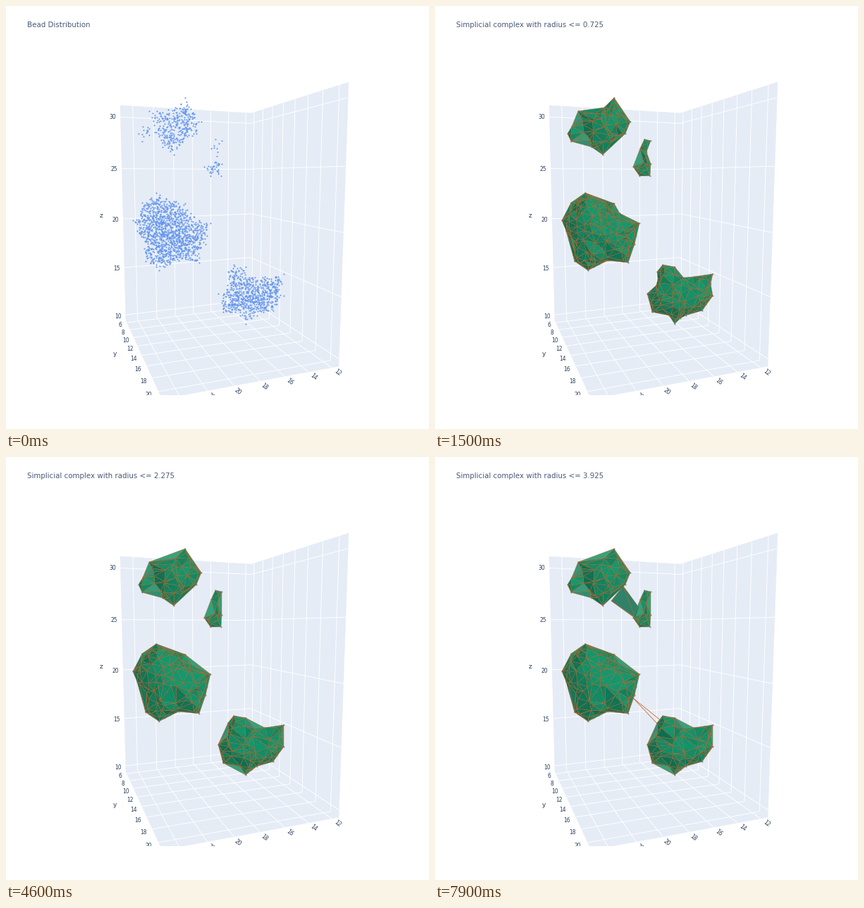
Recreate the animation shown at these times as a matplotlib script. Size 600 px wide and 600 px high, loop 8 s.

```python
import numpy as np
import matplotlib.pyplot as plt
from matplotlib.animation import FuncAnimation
from matplotlib.collections import LineCollection, PolyCollection
from matplotlib.path import Path
from matplotlib.patches import Polygon, Rectangle
from matplotlib.tri import Triangulation

FRAMES, STEP_MS = 80, 100
UNIT = 14.4            # pixels per data unit
PT = 0.72              # points per pixel at 100 dpi
SOLID, VEIL = 0.96, 0.82
WALL, INK, TITLE = "#e5ecf6", "#2a3f5f", "#4a5a78"
BEAD, EDGE = "#6495ed", "#c8682e"
DARK = np.array([8, 106, 74]) / 255
LIGHT = np.array([14, 152, 106]) / 255
LAMP = np.array([0.5, -0.35, 0.79])

rng = np.random.default_rng(12)


def resample(corners, step):
    """Walk round a closed outline, keeping every corner."""
    out = []
    for a, b in zip(corners, np.roll(corners, -1, axis=0)):
        k = max(1, int(round(np.hypot(*(b - a)) / step)))
        out.append(a + (b - a) * np.arange(k)[:, None] / k)
    return np.vstack(out)


def flat(p):
    return np.column_stack([p, np.zeros(len(p))])


def gaps(a, b):
    return np.sqrt(((a[:, None] - b[None]) ** 2).sum(-1))


def shade(tri, alpha):
    """Flat-shaded colours for triangles of shape (n, 3, 3)."""
    n = np.cross(tri[:, 1] - tri[:, 0], tri[:, 2] - tri[:, 0])
    n /= np.linalg.norm(n, axis=1, keepdims=True) + 1e-9
    n *= np.where(n[:, 2:] < 0, -1, 1)
    t = np.clip(n @ LAMP, 0, 1)[:, None]
    return np.column_stack([DARK + (LIGHT - DARK) * t,
                            np.broadcast_to(alpha, len(tri))])


def circumradius(tri):
    u, v = tri[:, 1] - tri[:, 0], tri[:, 2] - tri[:, 0]
    area = np.abs(u[:, 0] * v[:, 1] - u[:, 1] * v[:, 0]) / 2
    a, b, c = (np.linalg.norm(s, axis=1) for s in (u, v, v - u))
    return a * b * c / (4 * area + 1e-6)


class Blob:
    """Seeded bead cloud inside an outline, domed towards the viewer."""

    def __init__(self, count, *outline):
        c = np.array(outline, float)
        self.path = Path(np.vstack([c, c[:1]]))
        xy = rng.uniform(c.min(0), c.max(0), (count * 20, 2))
        xy = xy[self.path.contains_points(xy)]
        d = gaps(xy, resample(c, 1.5)).min(1)
        t = d / d.max()
        h = np.sqrt(t * (2 - t))
        keep = np.flatnonzero((rng.random(len(xy)) < h ** 1.3) & (d > 1.2))[:count]
        z = rng.uniform(-1, 1, len(keep)) * h[keep] * d.max()
        self.corners, self.rim = flat(c), flat(resample(c, 8))
        self.inner = np.column_stack([xy[keep], z])
        self.beads = np.vstack([self.inner, self.corners])
        self.dist = gaps(self.beads, self.beads) / UNIT
        self.reach = self.empty_ball()

    def empty_ball(self):
        """Radius of the largest empty ball resting on each inner bead."""
        p = self.inner / UNIT
        n = p - p.mean(0)
        n /= np.linalg.norm(n, axis=1, keepdims=True)
        d = p[None] - p[:, None]
        up = (d * n[:, None]).sum(-1)
        r = (d ** 2).sum(-1) / (2 * np.maximum(up, 1e-6))
        return np.where(up > 1e-6, r, np.inf).min(1)

    def sparse(self, r):
        """Edges and triangles between beads closer than 2r."""
        near = np.triu(self.dist < 2 * r, 1)
        edges = np.argwhere(near)
        tris = [(i, j, k) for i, j in edges
                for k in np.flatnonzero(near[i] & near[j])]
        tri = self.beads[np.array(tris, int).reshape(-1, 3)]
        tri = tri[np.argsort(tri[:, :, 2].mean(1))]
        return self.beads[edges][:, :, :2], tri

    def surface(self, r):
        """Front skin at radius r; pockets close as r outgrows them."""
        front = (self.inner[:, 2] > 0) & (self.reach > 0.44 * (r / 0.325) ** 0.4)
        rim = self.rim if r < 0.6 else self.corners
        v = np.vstack([rim, self.inner[front]])
        tri = v[Triangulation(v[:, 0], v[:, 1]).triangles]
        inside = self.path.contains_points(tri[:, :, :2].mean(1))
        shown = inside | (circumradius(tri[:, :, :2]) < min(24 * r, 45))
        return tri[shown], np.where(inside, SOLID, VEIL)[shown]


blobs = [
    Blob(330, (254, 130), (277, 164), (270, 181), (238, 211), (222, 200),
         (211, 179), (193, 192), (188, 181), (194, 171), (210, 169),
         (203, 149), (240, 144)),
    Blob(36, (297, 189), (306, 191), (300, 207), (306, 224), (305, 241),
         (290, 241), (281, 228), (296, 222), (291, 202)),
    Blob(1300, (213, 265), (254, 280), (262, 294), (290, 308), (283, 338),
         (274, 364), (245, 361), (217, 375), (198, 362), (186, 319),
         (180, 304), (193, 279)),
    Blob(700, (323, 367), (340, 370), (339, 381), (367, 384), (394, 380),
         (391, 394), (394, 411), (379, 432), (348, 443), (340, 451),
         (332, 439), (308, 434), (301, 408), (314, 396), (315, 377)),
]
beads = np.vstack([b.beads[:, :2] for b in blobs])

# Late bridges between blobs: birth radius and corners
bridges = [
    (2.65, (250, 204), (283, 228)),
    (3.3, (250, 204), (267, 183), (284, 228)),
    (3.6, (267, 183), (289, 213), (284, 228)),
    (3.75, (281, 342), (315, 378)),
    (3.9, (281, 342), (323, 376)),
]


def radius(i):
    return 0.05 * i - 0.025


def build(i):
    """Triangles, their colours and loose edges of one step."""
    tris, fills, edges = [np.zeros((0, 3, 3))], [np.zeros((0, 4))], []
    r = radius(i)

    def add(tri, alpha):
        tris.append(tri)
        fills.append(shade(tri, alpha))

    for birth, *pts in bridges:
        if r >= birth and len(pts) == 2:
            edges.append(pts)
        elif r >= birth:
            add(np.array([[(x, y, 0.9 * x - y) for x, y in pts]], float), VEIL)
    for b in blobs if i else []:
        if r < 0.3:
            lines, tri = b.sparse(r)
            edges.extend(lines)
            add(tri, SOLID)
        else:
            add(*b.surface(r))
    return np.vstack(tris)[:, :, :2], np.vstack(fills), edges


def homography(p00, p10, p11, p01):
    rows, rhs = [], []
    for (u, v), (x, y) in zip([(0, 0), (1, 0), (1, 1), (0, 1)],
                              [p00, p10, p11, p01]):
        rows += [[u, v, 1, 0, 0, 0, -u * x, -v * x],
                 [0, 0, 0, u, v, 1, -u * y, -v * y]]
        rhs += [x, y]
    m = np.append(np.linalg.solve(np.array(rows, float), rhs), 1).reshape(3, 3)

    def project(u, v):
        x, y, w = m @ (u, v, 1)
        return x / w, y / w
    return project


fig = plt.figure(figsize=(6, 6), dpi=100, facecolor="white")
ax = fig.add_axes([0, 0, 1, 1])
ax.set(xlim=(0, 600), ylim=(600, 0))
ax.axis("off")


def label(x, y, s, size=7.7, **kw):
    kw = {"color": INK, "ha": "center", "va": "center", **kw}
    return ax.text(x, y, s, fontsize=size * PT, family="DejaVu Sans", **kw)


def draw_box():
    back, left, right, front = (345, 424), (170, 446), (472, 511), (221.5, 557.5)
    top_b, top_l, top_r = (348, 152), (162, 141), (486, 108)
    xs = {t: 0.047 + 0.0723 * (t - 12) for t in range(12, 26, 2)}
    ys = {t: 0.042 + 0.0638 * (t - 6) for t in range(6, 22, 2)}
    zs = {t: (t - 9.4) / 21.7 for t in range(10, 31, 5)}
    faces, lines = [], []
    for quad, us, vs in [((back, left, front, right), xs, ys),
                         ((back, left, top_l, top_b), xs, zs),
                         ((back, right, top_r, top_b), ys, zs)]:
        ax.add_patch(Polygon(quad, fc=WALL, ec=WALL, lw=0.3, zorder=1))
        at = homography(*quad)
        faces.append(at)
        lines += [(at(u, 0), at(u, 1)) for u in us.values()]
        lines += [(at(0, v), at(1, v)) for v in vs.values()]
    ax.add_collection(LineCollection(lines, colors="white", linewidths=0.95 * PT,
                                     zorder=2))
    # Tick labels sit just beyond the face edges
    floor, wall = faces[:2]
    for t, v in zs.items():
        x, y = wall(1.055, v)
        label(x, y + 0.8, t)
    for t, v in ys.items():
        x, y = floor(1.05, v)
        label(x, y + 2.6, t)
    for t, u in xs.items():
        x, y = floor(u, 1.045)
        label(x, y + 1, t, rotation=-38)
    label(135, 298, "z", 9)
    label(154, 494, "y", 9)
    ax.add_patch(Rectangle((0, 551.5), 600, 49, fc="white", ec="none", zorder=9))


draw_box()
title = label(30, 30.3, "", 10.25, color=TITLE, ha="left", va="baseline")
ax.scatter(*beads.T, s=4.2 * PT ** 2, c=BEAD, linewidths=0, zorder=3)
links = ax.add_collection(LineCollection([], colors=EDGE, linewidths=0.8 * PT, zorder=4))
skin = ax.add_collection(PolyCollection([], edgecolors=(0.74, 0.39, 0.14, 0.72),
                                        linewidths=0.6 * PT, joinstyle="round",
                                        zorder=5))
scenes = [build(i) for i in range(FRAMES)]


def update(i):
    tri, fill, edges = scenes[i]
    skin.set_verts(tri)
    skin.set_facecolor(fill)
    links.set_segments(edges)
    title.set_text(f"Simplicial complex with radius <= {radius(i):.3f}"
                   if i else "Bead Distribution")
    return skin, links, title


anim = FuncAnimation(fig, update, frames=FRAMES, interval=STEP_MS,
                     repeat=True, repeat_delay=0, blit=False)
plt.show()
```
